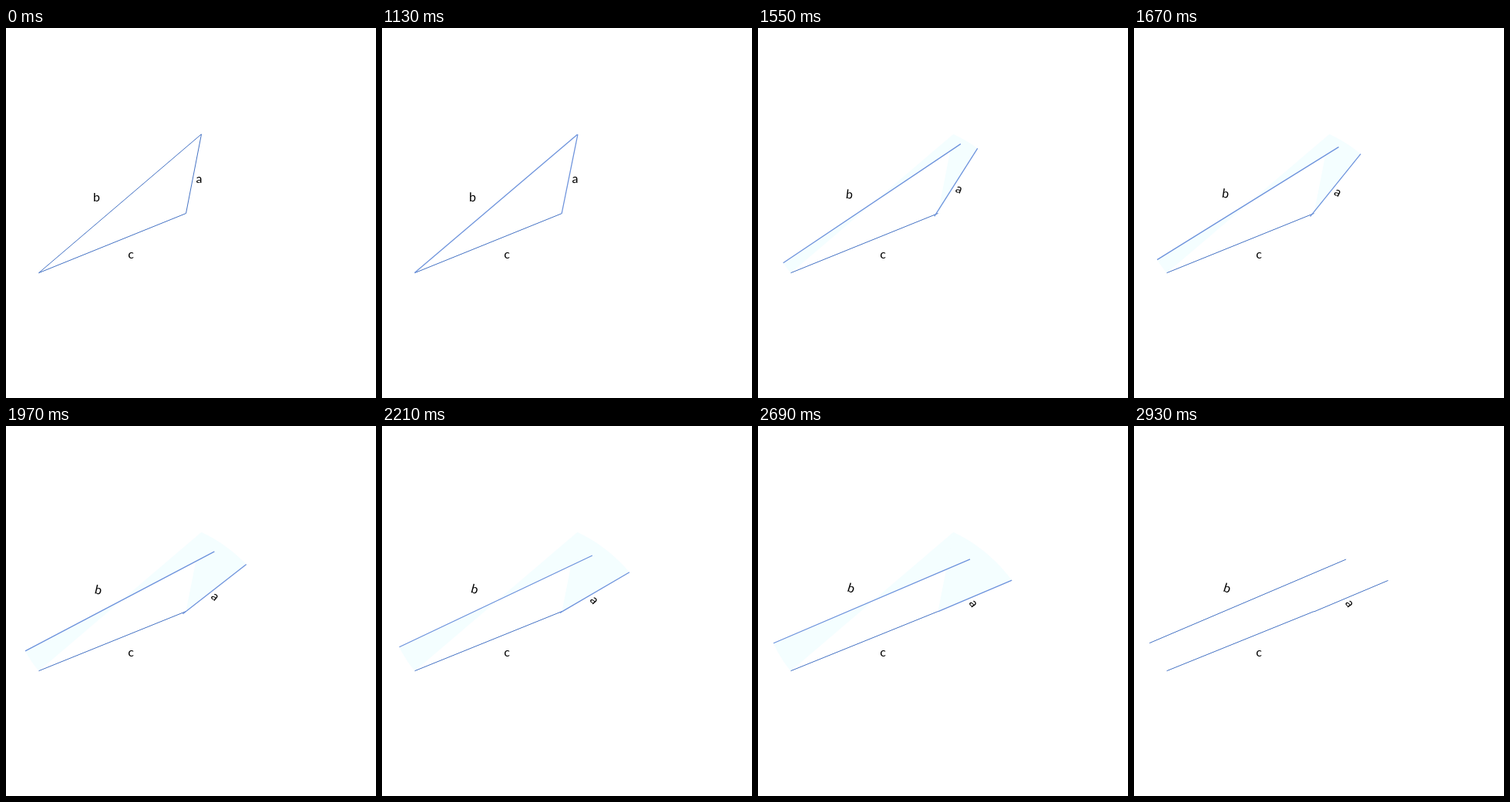
An HTML page with a canvas for the animation above (4.13 s loop, 480 by 480 pixels).

```html
<!DOCTYPE html>
<html lang="en">
<head>
<meta charset="utf-8">
<title>Triangle sides turning parallel</title>
<style>
  html, body { margin: 0; width: 100%; height: 100%; overflow: hidden; background: #fff; }
  canvas { display: block; width: 480px; height: 480px; }
</style>
</head>
<body>
<canvas id="stage" width="480" height="480"></canvas>
<script>
const ctx = document.getElementById('stage').getContext('2d');
const LOOP = 4130, START = 1130, END = 2930, STEP = 60;
const BLUE = '#4472c4', MOVING_BLUE = '#6c92dc', TRAIL = '#f4feff';
const rad = Math.PI / 180;

// Each side turns clockwise about its own centre while that centre drifts.
const sideA = { label: 'a', half: 52.2, tilt: 78.96, turn: 56.1, from: [243.5, 189.2],
                to: [281.5, 220.7], text: [7, 11.8], lag: 30 };
const sideB = { label: 'b', half: 138.6, tilt: 40.47, turn: 17.4, from: [148, 227.7],
                to: [147.6, 227.3], text: [-30.5, -2.7], lag: 0 };

// Short constant acceleration, then a long constant deceleration.
function ease(ms) {
  const rise = 280, total = 1710;
  const t = Math.min(Math.max(ms, 0), total);
  return t < rise ? t * t / (rise * total) : 1 - (total - t) ** 2 / (total * (total - rise));
}

function pose(side, ms) {
  const turn = side.turn * ease(ms);
  const drift = ease(ms - side.lag);
  const [x, y] = side.from.map((v, i) => v + (side.to[i] - v) * drift);
  const angle = (side.tilt - turn) * rad;
  const dx = side.half * Math.cos(angle), dy = side.half * Math.sin(angle);
  return { x, y, turn, top: [x + dx, y - dy], bottom: [x - dx, y + dy] };
}

function line(p, q, color, width) {
  ctx.strokeStyle = color;
  ctx.lineWidth = width;
  ctx.beginPath();
  ctx.moveTo(...p);
  ctx.lineTo(...q);
  ctx.stroke();
}

function sweep(side, end, pivot, ms) {
  ctx.fillStyle = TRAIL;
  ctx.beginPath();
  ctx.moveTo(...pivot);
  for (let t = 0; t <= ms; t += STEP) ctx.lineTo(...pose(side, t)[end]);
  ctx.fill();
}

function drawSide(side, ms, moving) {
  const p = pose(side, ms);
  line(p.bottom, p.top, moving ? MOVING_BLUE : BLUE, moving ? 1.25 : 1);
  ctx.save();
  ctx.translate(p.x, p.y);
  ctx.rotate(p.turn * rad);
  ctx.fillText(side.label, ...side.text);
  ctx.restore();
}

function draw(time) {
  const moving = time >= START && time < END;
  const ms = time < START ? 0
    : moving ? (Math.floor((time - START) / STEP) + 1) * STEP : END - START;

  ctx.fillStyle = '#fff';
  ctx.fillRect(0, 0, 480, 480);
  if (moving) {
    sweep(sideB, 'top', sideB.from, ms);
    sweep(sideB, 'bottom', sideB.from, ms);
    sweep(sideA, 'top', [233.5, 240.5], ms);
  }
  ctx.fillStyle = '#000';
  ctx.font = '16px Lato, sans-serif';
  ctx.textAlign = 'center';
  line([42.5, 317.7], [233.5, 240.5], BLUE, 1);
  ctx.fillText('c', 162, 299);
  drawSide(sideB, ms, moving);
  drawSide(sideA, ms, moving);
}

const begin = performance.now();
function tick() {
  draw((performance.now() - begin) % LOOP);
  requestAnimationFrame(tick);
}
tick();
</script>
</body>
</html>
```
